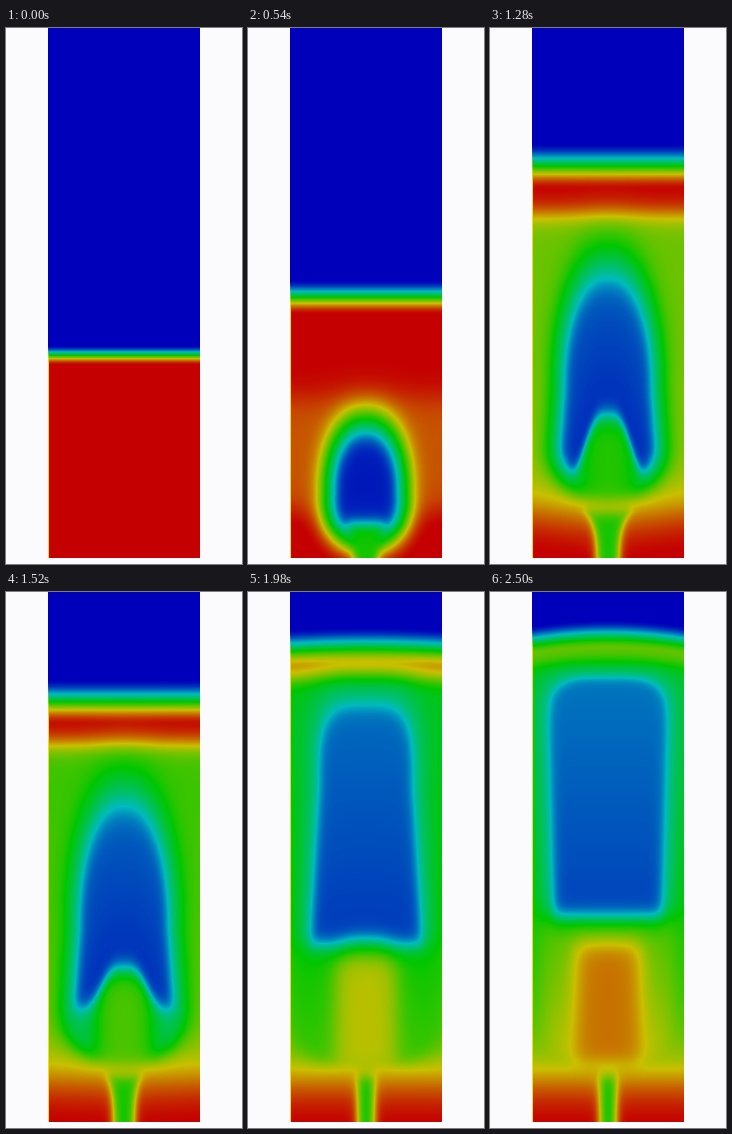
Write a matplotlib script that moves like this. It is 236x536 px and loops after 2600 ms.

```python
import numpy as np
import matplotlib.pyplot as plt
from matplotlib.animation import FuncAnimation
from matplotlib.colors import LinearSegmentedColormap

W, H, DPI = 236, 536, 64
LEFT, RIGHT, BOTTOM = 42, 194, 530
HALF = (RIGHT - LEFT) / 2
TICK = 20

# Simulation steps: every third one is held longer, and so is the last.
STEPS = 54
LAST = STEPS - 1
HOLDS = [5 if i % 3 == 1 or i == LAST else 1 for i in range(STEPS)]
STEP_OF_TICK = np.repeat(np.arange(STEPS), HOLDS)

CMAP = LinearSegmentedColormap.from_list("rainbow", [
    (0, 0, 0.73), (0, 0.73, 0.75), (0, 0.78, 0),
    (0.79, 0.75, 0), (0.77, 0, 0)], N=512)
EDGE_YELLOW = np.array([0.93, 0.87, 0.15])

Y, X = np.mgrid[0:BOTTOM, LEFT:RIGHT] + 0.5
U = np.abs(X - (LEFT + RIGHT) / 2)


def ramp(x, start, end):
    t = np.clip((x - start) / (end - start), 0, 1)
    return t * t * (3 - 2 * t)


def sig(x):
    return 0.5 + 0.5 * np.tanh(x / 2)


def mix(a, b, t):
    return a + (b - a) * t


def swell(k):
    """Zero at both ends of the run, one in the middle."""
    return np.sin(np.pi * k / LAST)


def front_line(k):
    """Height of the cold/hot front: speeds up, then settles at the top."""
    phase = min((k + 8) / 58, 1)
    return 45 + 148 * (1 + np.cos(np.pi * phase))


def surroundings(k):
    """Hot band under the front, cooling walls and hot floor."""
    line = front_line(k)
    y = Y - 6 * ramp(k, 36, LAST) * ((U / HALF) ** 2 - 0.5)
    thick = 20 + 22 * swell(k) + 9 * k / LAST
    front = ramp(y, line - thick / 2, line + thick / 2)

    cap = line + 20 + 160 * np.exp(-k / 16)
    depth = np.clip((Y - cap) / max(450 - cap, 1), 0, 1)
    wall = mix(1 - 0.55 * ramp(k, -4, 48), 1 - 0.4 * ramp(k, -4, 40),
               depth ** 2)
    peak = 1 - 0.37 * ramp(k, 33, 54)
    v = mix(peak, wall, sig((y - cap) / (10 - 0.11 * k)))

    tilt = 0.45 * np.exp(-((k - 19) / 8) ** 2)
    floor = 486 + tilt * (50 - U)
    soft = 8 + 8 * ramp(k, 10, 35)
    return mix(v, 1.02, sig((Y - floor) / soft)), front


def blob(k, pad, top_pad, soft):
    """Soft mask of the bubble, grown outward by the pads."""
    top = np.interp(k, [0, 43, LAST], [508, 112, 85])
    rise = 40 + 95 * ramp(k, 0, 40) - 80 * ramp(k, 36, 48)
    mid = top + rise
    foot = max(mid, 412 + 42 * (1 - ramp(k, 8, 20)))
    drop = 45 + pad
    power = 2.2 + 1.6 * ramp(k, 34, 46)
    flare = 0.07 - 0.1 * ramp(k, 40, LAST)

    width = 46 * (1 - np.exp(-k / 10)) + 14 * ramp(k, 40, LAST) + pad
    width = np.maximum(width + flare * np.maximum(Y - mid, 0), 1)
    dy = (np.maximum(mid - Y, 0) / (rise + top_pad)
          + np.maximum(Y - foot, 0) / drop)
    rho = ((U / width) ** power + dy ** power) ** (1 / power)
    return sig((1 - rho) * width / soft), top


def core_edge(k):
    """Underside of the cold core, pushed up in the middle by the plume."""
    centre = 480 - 2.95 * k - 12 * swell(k) + 60 * (1 - ramp(k, 10, 20))
    arch = 58 * ramp(k, 9, 21) * (1 - ramp(k, 28, 37)) + 10 * swell(k)
    return centre + arch * (1 - np.exp(-(U / 27) ** 3))


def wake(k, edge):
    """Legs and central plume below the core."""
    late = ramp(k, 30, LAST)
    depth = np.clip((Y - edge) / 140, 0, 1)
    legs = 0.38 + 0.2 * late + 0.14 * late * depth
    plume = (sig((20 + 0.25 * k - U) / 6)
             * sig((Y - edge - 26 * late) / 7))
    return mix(legs, 0.2 + 0.0123 * k, plume)


def stem(k):
    top = 484 + 20 * (1 - ramp(k, 8, 17))
    flare = 18 * ramp(k, 6, 18) * (1 - ramp(k, 20, 40))
    width = (11 - 3 * ramp(k, 25, 45)
             + flare * np.exp(-np.maximum(Y - top, 0) / 12))
    return ramp(k, 0, 2) * sig((width - U) / 2.5) * sig((Y - top) / 4)


def field(k):
    v, front = surroundings(k)
    edge = core_edge(k)
    below = sig((Y - edge) / 7)

    grown = ramp(k, 0, 8)
    halo, _ = blob(k, 14 * grown, (8 + 24 * swell(k)) * grown, 5)
    v = mix(v, mix(0.37, wake(k, edge), below), halo * grown)

    core, top = blob(k, 0, 0, 3.2)
    height = np.clip((edge - Y) / np.maximum(edge - top, 1), 0, 1)
    cold = 0.02 + 0.0013 * k + 0.07 * ramp(k, 15, 30) * height
    v = mix(v, cold, core * grown * sig((edge - Y) / 5))

    v = mix(v, 0.52, stem(k))
    return np.clip(v * front, 0, 1), front


def render(k):
    canvas = np.full((H, W, 3), (0.988, 0.988, 0.996))
    v, front = field(k)
    rgb = CMAP(v)[..., :3]
    rgb[:, 0] = mix(rgb[:, 0], EDGE_YELLOW, front[:, :1])
    canvas[:BOTTOM, LEFT:RIGHT] = rgb
    return canvas


fig = plt.figure(figsize=(W / DPI, H / DPI), dpi=DPI)
ax = fig.add_axes([0, 0, 1, 1])
ax.axis("off")
image = ax.imshow(render(0), interpolation="nearest", aspect="auto")


def update(tick):
    image.set_data(render(STEP_OF_TICK[tick]))
    return image,


anim = FuncAnimation(fig, update, frames=len(STEP_OF_TICK), interval=TICK,
                     repeat=True, repeat_delay=0)
plt.show()
```
